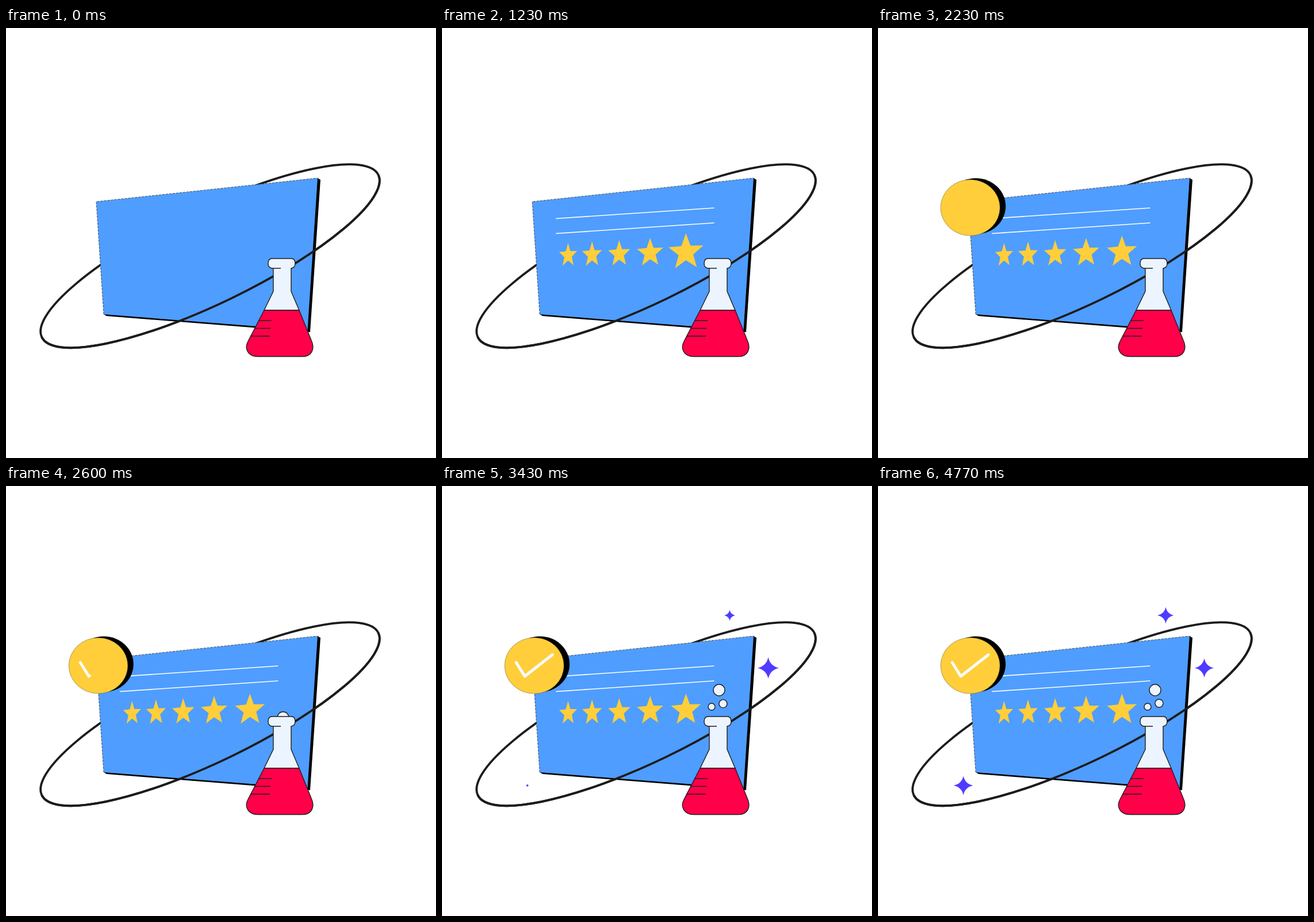
These frames come from a looping animation (748x748 px, 5010 ms). An HTML page:

```html
<!DOCTYPE html>
<html lang="en">
<head>
<meta charset="utf-8">
<title>Review card</title>
<style>
  html, body { margin: 0; width: 100%; height: 100%; overflow: hidden; background: #fff; }
  svg { display: block; width: 100%; height: 100%; }
  .ring { fill: none; stroke: #1c1c1c; stroke-width: 3.8; }
  .line { stroke: #fff; stroke-width: 1.7; }
  .ink { stroke: #1f1f1f; stroke-width: 1.4; }
</style>
</head>
<body>
<svg viewBox="0 0 748 748">
  <ellipse class="ring" rx="325" ry="82.4" transform="translate(355 396.7) rotate(-25.76)"/>

  <path d="M170 498L175 501L529 529L547 264L542 261Z"/>
  <path d="M157 302L542 261L524.5 526L170 498Z" fill="#4f9dff"/>
  <path d="M170 498L157 302L542 261" fill="none" stroke="#333" stroke-width=".8" stroke-dasharray="4 2"/>
  <path class="line" d="M198 331.5L473.5 313" pathLength="1"/>
  <path class="line" d="M198 357.5L473.5 339" pathLength="1"/>
  <g id="stars" fill="#ffce3a"></g>

  <path class="ring" d="M325 0A325 82.4 0 0 1 -325 0" transform="translate(355 396.7) rotate(-25.76)"/>
  <g id="bubbles" class="ink" fill="#ecf4ff"></g>

  <g class="ink" fill="#ecf4ff">
    <path d="M478 418H463Q456 417 456 409.500Q456 401 463 401H496Q503 401 503 409.500Q503 417 496 418V458L510 491H449L465 458V418"/>
    <path fill="#ff0049" d="M449 491L421 545C414 558 421 571.500 438 571.500H516C532 571.500 538 558 531 543L510 491Z"/>
    <path d="M439 509H462M432 522.500H460M425 536H459"/>
  </g>

  <g id="badge">
    <ellipse cx="170.300" cy="310" rx="51.700" ry="48.600"/>
    <ellipse cx="160.500" cy="312.500" rx="51.500" ry="48.700" fill="#ffce3a" stroke="#333" stroke-width=".4"/>
    <path id="check" d="M129 307L144 331L192 293.500" pathLength="1" fill="none" stroke="#fff"
      stroke-width="4.800" stroke-linecap="round" stroke-linejoin="round"/>
  </g>
  <g id="sparkles" fill="#4f3cff"></g>
</svg>
<script>
const LOOP = 5010, FRAME = 1000 / 30;
const $ = id => document.getElementById(id);
const lines = document.querySelectorAll('.line');

const ease = (t, start, length) => {
  const u = Math.min(1, Math.max(0, (t - start) / length));
  return u * u * (3 - 2 * u);
};

// Grow past full size, dip slightly below it, then settle at 1.
const pop = (t, start, peak, rise = 433) => {
  const over = peak - 1, top = start + rise;
  return peak * ease(t, start, rise) - over * 1.06 * ease(t, top, 267) + over * 0.06 * ease(t, top + 267, 233);
};

function add(parent, tag, attrs) {
  const el = document.createElementNS('http://www.w3.org/2000/svg', tag);
  for (const name in attrs) el.setAttribute(name, attrs[name]);
  return parent.appendChild(el);
}

const starPath = 'M' + Array.from({ length: 10 }, (_, i) => {
  const r = i % 2 ? 0.42 : 1, a = i * Math.PI / 5;
  return [r * Math.sin(a), 0.095 - r * Math.cos(a)].map(v => v.toFixed(3));
}).join('L') + 'Z';
const sparklePath = 'M0 -1Q.17 -.17 1 0Q.17 .17 0 1Q-.17 .17 -1 0Q-.17 -.17 0 -1Z';

// x, y, horizontal radius, vertical radius
const stars = [
  [219.3, 393.5, 16.3, 21.5], [261, 392.3, 18, 23], [308.2, 390.8, 20.4, 24],
  [362, 388.8, 24, 26], [424.3, 387, 27.4, 28.5]
].map(([x, y, rx, ry], i) => ({ x, y, rx, ry, start: 167 + i * 133.3, el: add($('stars'), 'path', { d: starPath }) }));

// x, y, radius; listed in order of appearance
const sparkles = [[567.5, 316.5, 16.8], [500.5, 225, 14.2], [148.5, 521, 16.8]]
  .map(([x, y, r], i) => ({ x, y, r, start: 3067 + i * 133.3, el: add($('sparkles'), 'path', { d: sparklePath }) }));

// start x, start y, end x, end y, radius, start time
const bubbles = [[482, 412, 482, 355, 10, 2387], [474, 410, 469, 384, 6, 2475], [485, 412, 489, 378, 7, 2670]]
  .map(([x0, y0, x1, y1, r, start]) => ({ x0, y0, x1, y1, start, el: add($('bubbles'), 'circle', { r }) }));

function trace(el, p) {
  el.setAttribute('stroke-dasharray', `${p} 2`);
  el.setAttribute('visibility', p > 0 ? 'visible' : 'hidden');
}

function draw(now) {
  const t = Math.floor((now % LOOP + 3.4) / FRAME) * FRAME;

  lines.forEach((el, i) => trace(el, ease(t, i * 367, 700)));
  trace($('check'), ease(t, 2367, 600));

  for (const s of stars) {
    const k = pop(t, s.start, 1.25);
    s.el.setAttribute('transform', `translate(${s.x} ${s.y}) skewY(-3) scale(${k * s.rx} ${k * s.ry})`);
  }
  for (const s of sparkles) {
    s.el.setAttribute('transform', `translate(${s.x} ${s.y}) scale(${pop(t, s.start, 1.2) * s.r})`);
  }
  for (const b of bubbles) {
    const p = ease(t, b.start, 833);
    b.el.setAttribute('cx', b.x0 + (b.x1 - b.x0) * p);
    b.el.setAttribute('cy', b.y0 + (b.y1 - b.y0) * p);
  }
  $('badge').setAttribute('transform',
    `translate(165.5 311) scale(${pop(t, 1683, 1.09, 667)}) translate(-165.5 -311)`);
}

let origin;
function tick(now) {
  origin ??= now;
  draw(now - origin);
  requestAnimationFrame(tick);
}
draw(0);
requestAnimationFrame(tick);
</script>
</body>
</html>
```
